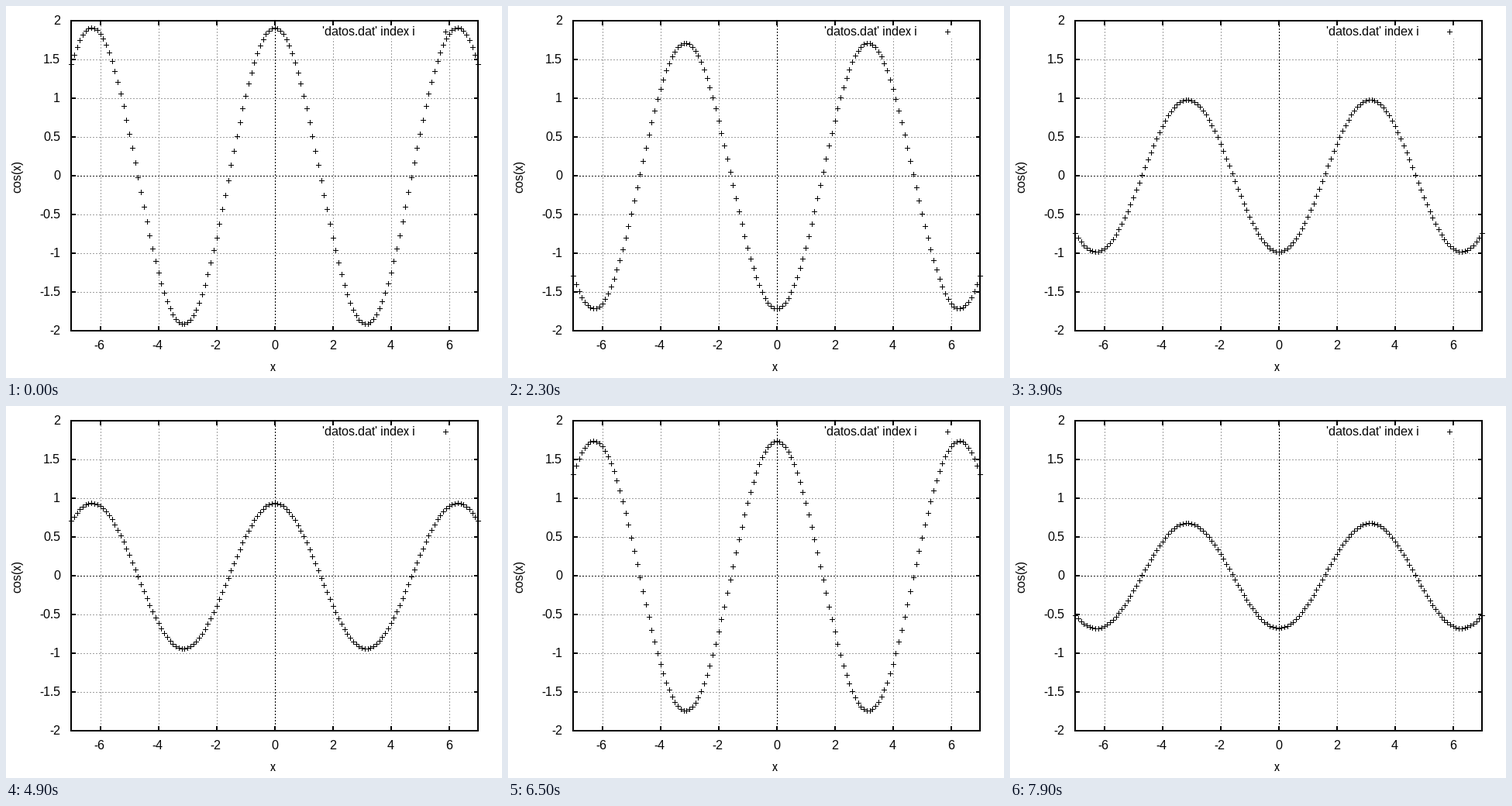
These frames come from a looping animation (640x480 px, 8 s). A matplotlib script:

```python
import numpy as np
import matplotlib.pyplot as plt
from matplotlib.animation import FuncAnimation
from matplotlib.collections import LineCollection

W, H, DPI = 640, 480, 100
PX = 72 / DPI  # one pixel in points
LEFT, RIGHT, TOP, BOTTOM = 84, 609, 19, 419
KEY_BOTTOM = 42  # the vertical grid stops under the key
FRAMES, STEP_MS = 80, 100

plt.rcParams.update({
    "font.family": "Liberation Sans",
    "font.size": 16 * PX,
    "text.hinting": "default",
    "text.hinting_factor": 1,
    "path.simplify": False,
})

fig = plt.figure(figsize=(W / DPI, H / DPI), dpi=DPI, facecolor="white")
ax = fig.add_axes([0, 0, 1, 1])
ax.set_xlim(0, W)
ax.set_ylim(H, 0)
ax.axis("off")


def col(x):
    return np.floor(LEFT + (x + 7) * 37.5 + 0.5)


def row(y):
    return BOTTOM - np.floor((y + 2) * 100 + 0.5)


def line(xs, ys, width=1, color="black", **kw):
    ax.plot(xs, ys, color=color, lw=width * PX, snap=False,
            solid_capstyle="butt", dash_capstyle="butt", **kw)


def dotted(xs, ys, color, z):
    line(xs, ys, color=color, ls=(0, (2, 2)), zorder=z)


def label(x, y, text, ha, **kw):
    ax.text(x, y, text, ha=ha, va="baseline", zorder=5, **kw)


def crosses(px, py):
    """Seven-pixel plus signs centred on whole pixels."""
    cx, cy = px + 0.5, py + 0.5
    flat = np.stack([np.stack([cx - 3.5, cy], -1), np.stack([cx + 3.5, cy], -1)], 1)
    tall = np.stack([np.stack([cx, cy - 3.5], -1), np.stack([cx, cy + 3.5], -1)], 1)
    return np.concatenate([flat, tall])


# Grid, ticks and tick labels
for v in range(-6, 7, 2):
    x = col(v)
    end = KEY_BOTTOM if v > 0 else TOP
    dotted([x + 0.5] * 2, [BOTTOM, end], "#a0a0a0", 1)
    line([x, x], [TOP, TOP + 6], 2, zorder=3)
    line([x, x], [BOTTOM - 6, BOTTOM], 2, zorder=3)
    label(x - 2 if v < 0 else x - 0.5, 443, str(v), "center")

for v in np.arange(-2, 2.1, 0.5):
    y = row(v)
    if abs(v) < 2:
        dotted([LEFT, RIGHT], [y + 0.5] * 2, "#a0a0a0", 1)
        line([LEFT, LEFT + 6], [y, y], 2, zorder=3)
        line([RIGHT - 5, RIGHT], [y, y], 2, zorder=3)
    label(70, y + 5, f"{v:g}", "right")

# Zero axes and border
dotted([LEFT, RIGHT], [row(0) + 0.5] * 2, "black", 2)
dotted([col(0) + 0.5] * 2, [BOTTOM, TOP], "black", 2)
line([LEFT, RIGHT, RIGHT, LEFT, LEFT, RIGHT], [TOP, TOP, BOTTOM, BOTTOM, TOP, TOP],
     2, zorder=3, solid_joinstyle="miter")

# Axis names and key
label(344, 471, "x", "center")
label(19, 220, "cos(x)", "right", rotation=90, rotation_mode="anchor") if False else None
ax.text(19, 220, "cos(x)", rotation=90, rotation_mode="anchor",
        ha="center", va="baseline", zorder=5)
label(408, 38, "'datos.dat' index i", "left")

X = np.arange(-70, 71) / 10
PX_X = np.append(col(X), 567)
marks = LineCollection([], colors="black", linewidths=PX, capstyle="butt",
                       snap=False, clip_on=False, zorder=4)
ax.add_collection(marks, autolim=False)


def draw(i):
    # Two opposite travelling waves add up to a standing one
    t = 0.3 + 0.1 * i
    wave = np.cos(X - t) + np.cos(X + t)
    marks.set_segments(crosses(PX_X, np.append(row(wave), 33)))
    return [marks]


anim = FuncAnimation(fig, draw, frames=FRAMES, interval=STEP_MS,
                     repeat=True, repeat_delay=0, blit=False)
plt.show()
```
